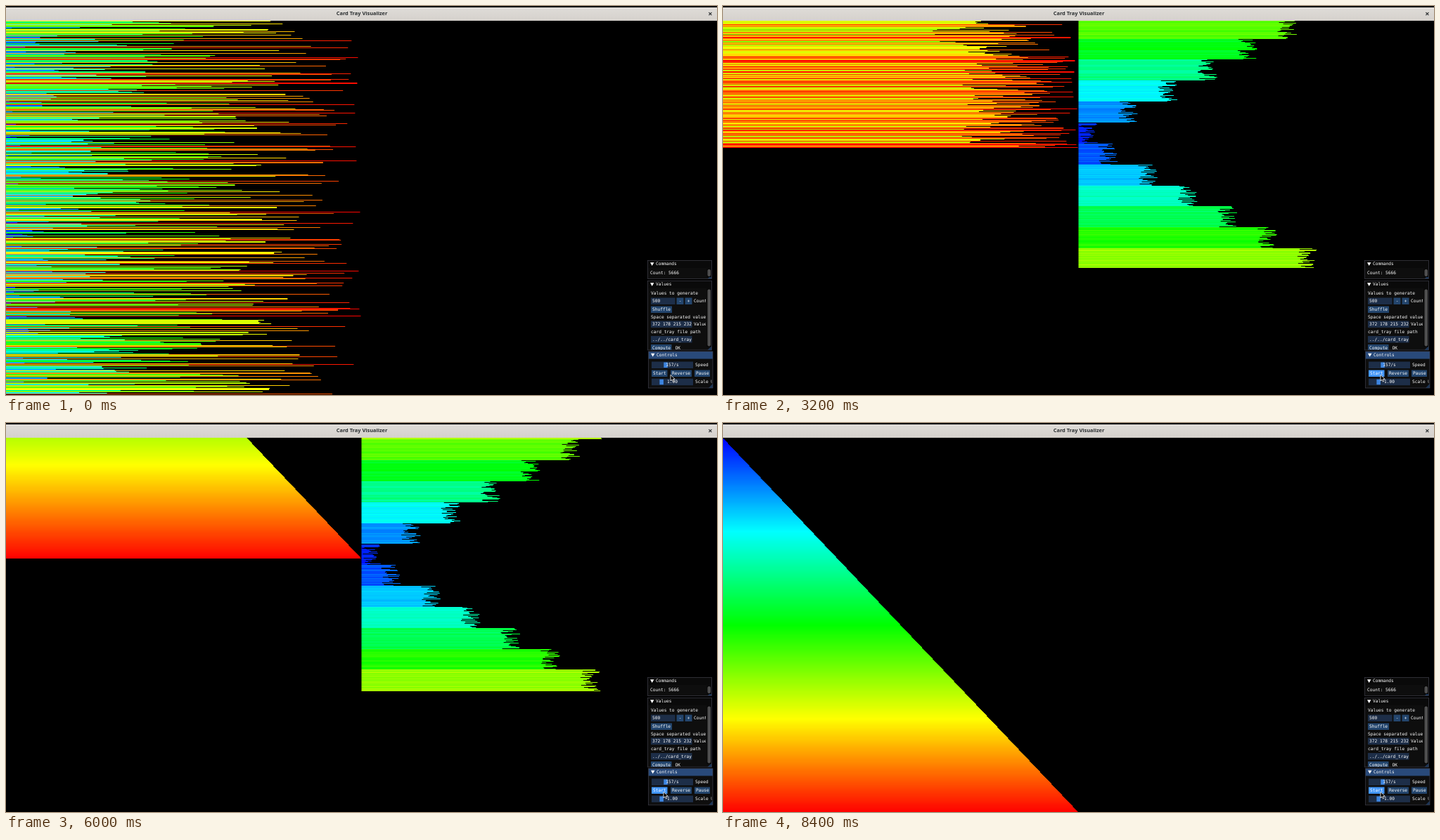
Animation of 1011x554 px, one loop 8600 ms. Source, as an HTML page with a canvas:

```html
<!DOCTYPE html>
<html>
<head>
<meta charset="utf-8">
<style>
html, body { margin: 0; height: 100%; overflow: hidden; background: #000; }
canvas { display: block; }
</style>
</head>
<body>
<canvas id="stage" width="1011" height="554"></canvas>
<script>
const WIDTH = 1011, HEIGHT = 554, TOP = 21;
const N = 500, CHUNK = 56, ROW = (HEIGHT - TOP) / N, UNIT = WIDTH / 2 / N;
const STEP_MS = 200, STEPS = 43;
const ctx = document.getElementById('stage').getContext('2d');

// The first values match the input field, the rest is a seeded shuffle.
function makeOrder() {
  let seed = 7;
  const random = () => (seed = (seed * 16807) % 2147483647) / 2147483647;
  const head = [372, 178, 215, 232];
  const rest = [...Array(N).keys()].filter(v => !head.includes(v));
  for (let i = rest.length - 1; i > 0; i--) {
    const j = Math.floor(random() * (i + 1));
    [rest[i], rest[j]] = [rest[j], rest[i]];
  }
  return [...head, ...rest];
}

const moves = {
  pa: (a, b) => a.unshift(b.shift()),
  pb: (a, b) => b.unshift(a.shift()),
  ra: a => a.push(a.shift()),
  rb: (a, b) => b.push(b.shift()),
  rrb: (a, b) => b.unshift(b.pop())
};

// Chunks go to b, upper half to its bottom; then the largest returns first.
function plan(order) {
  const a = [...order], b = [], ops = [], pushAt = [0];
  const act = op => {
    moves[op](a, b);
    ops.push(op);
    if (op[0] === 'p') pushAt.push(ops.length);
  };
  for (let low = 0; low < N; low += CHUNK) {
    let left = Math.min(CHUNK, N - low);
    while (left) {
      const value = a[0];
      if (value < low + CHUNK) {
        act('pb');
        left--;
        if (value >= low + CHUNK / 2) act('rb');
      } else act('ra');
    }
  }
  while (b.length) {
    const max = Math.max(...b);
    const turn = b.indexOf(max) <= b.length / 2 ? 'rb' : 'rrb';
    while (b[0] !== max) act(turn);
    act('pa');
  }
  return { ops, pushAt };
}

const order = makeOrder();
const { ops, pushAt } = plan(order);

// Playback speed: [step, pushes done]
const pace = [[0, 0], [9, 159], [16, 330], [21, 525], [30, 661], [35, 754], [42, 2 * N]];

function opsDone(step) {
  const i = Math.max(1, pace.findIndex(([s]) => s >= step));
  const [s0, p0] = pace[i - 1], [s1, p1] = pace[i];
  return Math.round(pushAt[p0] + (pushAt[p1] - pushAt[p0]) * (step - s0) / (s1 - s0));
}

const FIELD = '#1d2e48', BUTTON = '#23456d', HOVER = '#4296fa', GRAB = '#3d85e0';
const TITLE = '#0a0a0a', ACTIVE_TITLE = '#294a7a', INK = '#2b2f31';

function rect(x, y, w, h, color) {
  ctx.fillStyle = color;
  ctx.fillRect(x, y, w, h);
}

function text(str, x, y, align = 'left') {
  ctx.font = '6.2px "DejaVu Sans Mono", monospace';
  ctx.textAlign = align;
  ctx.textBaseline = 'middle';
  ctx.fillStyle = '#fff';
  ctx.fillText(str, x, y);
}

function shape(points, fill, stroke) {
  ctx.beginPath();
  points.forEach(([x, y]) => ctx.lineTo(x, y));
  ctx.closePath();
  ctx.fillStyle = fill;
  ctx.fill();
  if (stroke) {
    ctx.strokeStyle = stroke;
    ctx.lineWidth = 0.8;
    ctx.stroke();
  }
}

function clipped(x, y, w, h, draw) {
  ctx.save();
  ctx.beginPath();
  ctx.rect(x, y, w, h);
  ctx.clip();
  draw();
  ctx.restore();
}

function box(str, x, y, w, color, pad = 2) {
  rect(x, y, w, 9.5, color);
  text(str, x + pad, y + 5);
}

function slider(str, y, grabX, label) {
  rect(918, y, 59, 9.5, FIELD);
  rect(grabX, y + 1, 5.5, 7.5, GRAB);
  text(str, 947.5, y + 5, 'center');
  text(label, 980, y + 5);
}

function scrollbar(y, h) {
  rect(996.5, y - 1, 6.5, h + 2, '#070707');
  ctx.fillStyle = '#4f4f4f';
  ctx.beginPath();
  ctx.roundRect(997.5, y, 4.5, h, 2);
  ctx.fill();
}

function panel(title, x, y, w, h, titleColor, content) {
  clipped(x, y, w, h, () => {
    rect(x, y, w, h, 'rgba(15,15,15,.94)');
    rect(x, y, w, 10.5, titleColor);
    shape([[x + 3.5, y + 2.8], [x + 9, y + 2.8], [x + 6.2, y + 7.6]], '#fff');
    text(title, x + 11.5, y + 5.3);
    shape([[x + w, y + h - 6], [x + w, y + h], [x + w - 6, y + h]], '#1b3557');
    content();
  });
  ctx.strokeStyle = '#40404a';
  ctx.lineWidth = 0.7;
  ctx.strokeRect(x, y, w, h);
}

function drawPanels(started) {
  panel('Commands', 912.5, 362.5, 91, 26, TITLE, () => {
    text('Count: 5666', 916, 380);
    scrollbar(375, 10);
  });
  panel('Values', 912.5, 391.5, 91, 98.5, TITLE, () => {
    clipped(912, 402, 83, 88, () => {
      text('Values to generate', 917, 409.5);
      box(String(N), 917, 415.5, 34.5, FIELD);
      box('-', 953.5, 415.5, 10, BUTTON, 3.2);
      box('+', 965.5, 415.5, 10, BUTTON, 3.2);
      text('Count', 978, 420.5);
      box('Shuffle', 917, 427.5, 30, BUTTON);
      text('Space separated values', 917, 443);
      box(order.slice(0, 4).join(' '), 917, 448.5, 58.5, FIELD);
      text('Values', 978, 453.5);
      text('card_tray file path', 917, 464.3);
      box('../../card_tray', 917, 470, 58.5, FIELD);
      box('Compute', 917, 482, 29.5, BUTTON);
      text('OK', 951.5, 487);
    });
    scrollbar(403.5, 81);
  });
  panel('Controls', 913.5, 492, 91.5, 52, ACTIVE_TITLE, () => {
    clipped(913, 502, 90.5, 42, () => {
      slider('157/s', 506.5, 935.3, 'Speed');
      box('Start', 918, 518.5, 22.5, started ? HOVER : BUTTON);
      box('Reverse', 945, 518.5, 30, BUTTON);
      box('Pause', 979, 518.5, 22, BUTTON);
      slider('1.00', 530.7, 929.4, 'Scale U');
    });
  });
}

function drawTitleBar() {
  const shade = ctx.createLinearGradient(0, 2, 0, TOP);
  shade.addColorStop(0, '#dfdcd8');
  shade.addColorStop(1, '#d5d1cc');
  rect(0, 2, WIDTH, TOP - 2, shade);
  ctx.font = 'bold 7.4px "Noto Sans", sans-serif';
  ctx.textAlign = 'center';
  ctx.textBaseline = 'middle';
  ctx.fillStyle = INK;
  ctx.fillText('Card Tray Visualizer', 506, 11.3);
  ctx.strokeStyle = INK;
  ctx.lineWidth = 1.2;
  ctx.beginPath();
  for (const d of [-2, 2]) {
    ctx.moveTo(1001.4 - d, 9.2);
    ctx.lineTo(1001.4 + d, 13.2);
  }
  ctx.stroke();
}

function drawStack(stack, x) {
  stack.forEach((value, i) => {
    const y = Math.round(TOP + i * ROW);
    const h = Math.round(TOP + (i + 1) * ROW) - y;
    rect(x, y, value * UNIT, h, `hsl(${240 * (1 - value / N)} 100% 50%)`);
  });
}

function drawCursor(x, y) {
  const arrow = [[0, 0], [0, 8.6], [2, 6.8], [3.4, 9.8], [4.8, 9.1], [3.5, 6.3], [6.1, 6.1]];
  shape(arrow.map(([dx, dy]) => [x + dx, y + dy]), '#000', '#fff');
}

function draw(step) {
  const a = [...order], b = [], started = step > 0;
  ops.slice(0, opsDone(step)).forEach(op => moves[op](a, b));
  rect(0, 0, WIDTH, HEIGHT, '#000');
  drawStack(a, 0);
  drawStack(b, WIDTH / 2);
  drawTitleBar();
  drawPanels(started);
  drawCursor(started ? 935 : 945, 525.3);
}

let shown = -1;
function tick() {
  const step = Math.floor(performance.now() / STEP_MS) % STEPS;
  if (step !== shown) draw(shown = step);
  requestAnimationFrame(tick);
}
tick();
</script>
</body>
</html>
```
